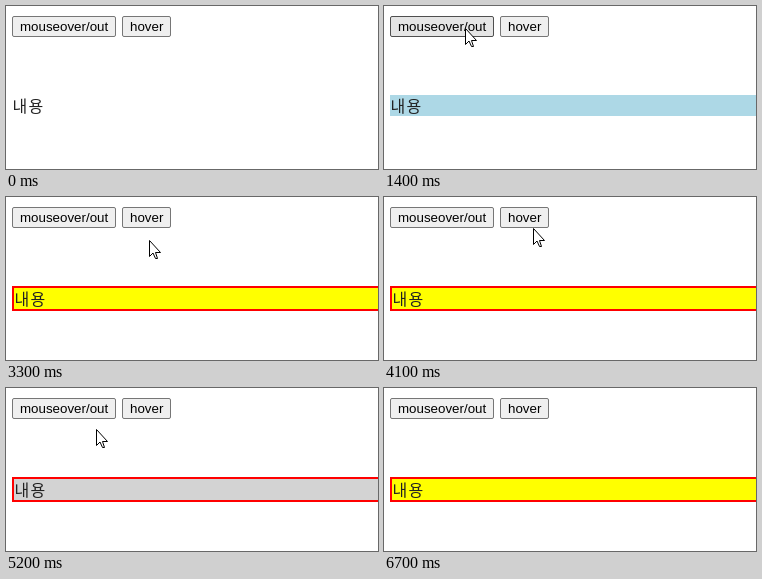
An HTML page for the animation above (7.2 s loop, 372x163 px).

```html
<!DOCTYPE html>
<html lang="ko">
<head>
<meta charset="utf-8">
<title>mouseover / hover</title>
<style>
  html, body { margin: 0; width: 100%; height: 100%; overflow: hidden; background: #fff; }
  svg { display: block; }
  .btn rect { fill: #efefef; stroke: #767676; }
  .btn.on rect { fill: #e5e5e5; stroke: #4f4f4f; }
  .btn text { font: 13.333px "Liberation Sans", Arial, sans-serif; }
  #word {
    font: 300 16px "Noto Sans CJK KR Light", "Noto Sans CJK KR", "Noto Sans CJK", sans-serif;
    letter-spacing: 1.3px;
    fill: #222;
  }
</style>
</head>
<body>
<svg width="372" height="163" viewBox="0 0 372 163">
  <g class="btn">
    <rect x="6.5" y="10.5" width="103" height="20" rx="1.5"/>
    <text x="14" y="25">mouseover/out</text>
  </g>
  <g class="btn">
    <rect x="116.5" y="10.5" width="48" height="20" rx="1.5"/>
    <text x="124" y="25">hover</text>
  </g>
  <rect id="frame" x="6" y="89" width="380" height="25" fill="red"/>
  <rect id="fill"/>
  <text id="word">내용</text>
  <path id="cursor" d="M.5 .5V16.5L4 13 6.5 18.5H8.5L6.5 12.5H11.5Z" fill="#fff" stroke="#000"/>
</svg>
<script>
const LOOP = 7200, STEP = 100;
const away = { x: 400, y: 45 };
const first = { x: 81, y: 22 };
const second = { x: 143, y: 22 };
const below = { x: 143, y: 50 };

// Each move bends from the last resting place, by way of "via", to "to".
const moves = [
  { start: 100, steps: 6, via: { x: 60, y: 58 }, to: first },
  { start: 800, steps: 7, via: { x: 80, y: 71 }, to: first },
  { start: 1800, steps: 7, via: { x: 110, y: 96 }, to: second },
  { start: 2800, steps: 2, via: second, to: below },
  { start: 3300, steps: 4, via: { x: 142, y: 36 }, to: second },
  { start: 4000, steps: 4, via: { x: 149, y: 30 }, to: { x: 153, y: 42 } },
  { start: 4500, steps: 6, via: { x: 57, y: 38 }, to: first },
  { start: 5200, steps: 7, via: { x: 112, y: 98 }, to: { x: 145, y: 21 } },
  { start: 6200, steps: 6, via: { x: 170, y: 76 }, to: away }
];

const $ = id => document.getElementById(id);
const buttons = [...document.querySelectorAll('.btn')];
const set = (el, attrs) => {
  for (const k in attrs) el.setAttribute(k, attrs[k]);
};

const bend = (a, b, c, u) =>
  Math.round((1 - u) ** 2 * a + 2 * u * (1 - u) * b + u * u * c);

const hit = (x, y) =>
  y < 10 || y >= 31 ? -1 : x >= 6 && x < 110 ? 0 : x >= 116 && x < 165 ? 1 : -1;

const onLeave = [{ bg: 'lightgray' }, { bg: 'yellow' }];
const onEnter = [{ bg: 'lightblue' }, { border: true }];

// Replay the pointer through the button handlers once.
let state = { t: 0, ...away, over: -1, bg: 'white', border: false };
const states = [state];
for (const { start, steps, via, to } of moves) {
  const from = state;
  for (let i = 1; i <= steps; i++) {
    const x = bend(from.x, via.x, to.x, i / steps);
    const y = bend(from.y, via.y, to.y, i / steps);
    const over = hit(x, y), last = state.over;
    state = { ...state, t: start + (i - 1) * STEP, x, y, over };
    if (over !== last) Object.assign(state, onLeave[last], onEnter[over]);
    states.push(state);
  }
}

let shown;
function draw() {
  const t = performance.now() % LOOP;
  const s = states.findLast(s => s.t <= t);
  if (s !== shown) {
    shown = s;
    const b = s.border ? 2 : 0;
    buttons.forEach((el, i) => el.classList.toggle('on', i === s.over));
    set($('frame'), { visibility: b ? 'visible' : 'hidden' });
    set($('fill'), { x: 6 + b, y: 89 + b, width: 380, height: 21, fill: s.bg });
    set($('word'), { x: 6.5 + b, y: 106 + b });
    set($('cursor'), { transform: `translate(${s.x} ${s.y})` });
  }
  requestAnimationFrame(draw);
}
draw();
</script>
</body>
</html>
```
